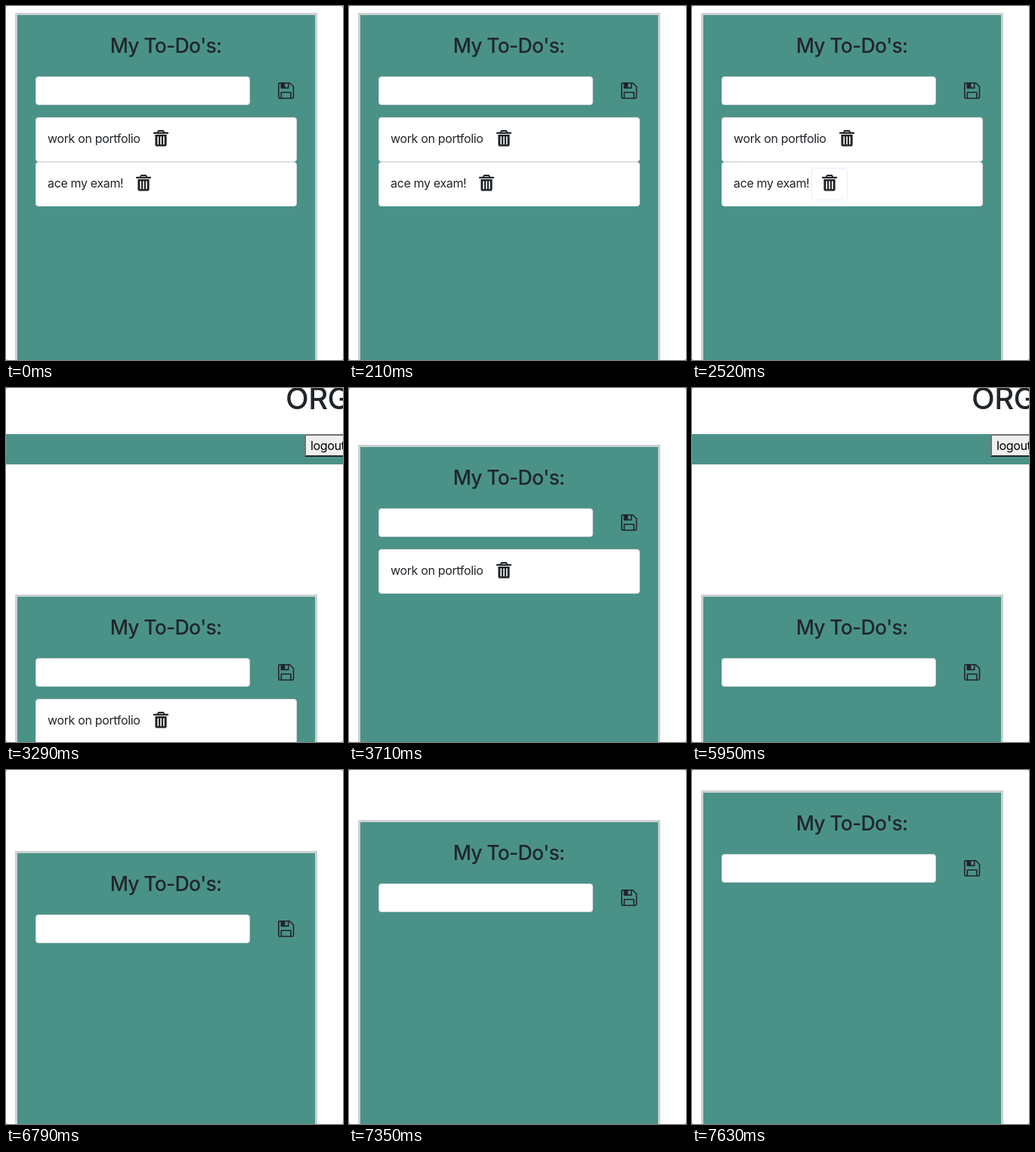
An HTML page for the animation above (8330 ms loop, 446 by 468 pixels).

```html
<!DOCTYPE html>
<html lang="en">
<head>
<meta charset="utf-8">
<title>To-do list</title>
<style>
html, body { margin: 0; width: 100%; height: 100%; overflow: hidden; background: #666; }
svg { display: block; width: 446px; height: 468px; background: #fff; border-radius: 2px; }
text { font: 16px Inter, "Liberation Sans", sans-serif; letter-spacing: -.35px; fill: #212529; }
.title { font-size: 26.5px; font-weight: 500; letter-spacing: -.7px; text-anchor: middle; }
.brand { font-size: 40px; font-weight: 500; letter-spacing: -.5px; }
.teal { fill: #4a9288; }
.ink { fill: #212529; }
.line { fill: none; stroke: #212529; stroke-width: 1.6; stroke-linejoin: round; }
</style>
</head>
<body>
<svg viewBox="0 0 446 468">
  <defs>
    <g id="trash">
      <path class="line" style="stroke-width:1.8" d="M-4.6-7.4l1.5-2.6h6.2l1.5 2.6"/>
      <rect class="ink" x="-10" y="-8.2" width="20" height="2.2" rx=".8"/>
      <path class="ink" d="M-7.6-5h15.2v13a2.6 2.6 0 0 1-2.6 2.6h-10a2.6 2.6 0 0 1-2.6-2.6z"/>
      <path stroke="#fff" stroke-width="1.6" stroke-linecap="round" d="M-3.8-2V7.4M0-2V7.4M3.8-2V7.4"/>
    </g>
  </defs>

  <g id="header">
    <text class="brand" x="370" y="28">ORGANIZE</text>
    <rect class="teal" y="61" width="446" height="40"/>
    <rect x="395" y="61" width="60" height="30" fill="#212529"/>
    <path d="M395 91V61h60v2h-58v26z" fill="#6f7375"/>
    <rect x="397" y="63" width="58" height="26" fill="#efefef"/>
    <text x="403" y="82" style="fill:#000">logout</text>
  </g>

  <g id="panel">
    <rect x="13.5" y="1.5" width="397" height="700" class="teal" stroke="#cdd1d3" stroke-width="3"/>
    <text class="title" x="211.5" y="53">My To-Do's:</text>
    <rect x="39.5" y="84.5" width="283" height="37" rx="3.5" fill="#fff" stroke="#ced4da"/>
    <g class="line" transform="translate(360 92)">
      <path d="M2 .8h13.5l5 5V19.5a1.5 1.5 0 0 1-1.5 1.5H2.3a1.5 1.5 0 0 1-1.5-1.5V2A1.2 1.2 0 0 1 2 .8z"/>
      <path d="M4.3 1v6.4h9.4V1M4.3 21v-7.8h12.6V21"/>
      <path class="ink" stroke="none" d="M4.3 1h5v6.4h-5z"/>
    </g>
    <g id="list"></g>
  </g>
</svg>
<script>
const LOOP = 8330, STEP = 70, HOME = 273;
const $ = id => document.getElementById(id);

const items = [
  { label: 'work on portfolio', icon: 205, from: 3290, until: 5950,
    focus: [[5320, 2], [5390, 4]] },
  { label: 'ace my exam!', icon: 182, from: Infinity, until: 3220,
    focus: [[2520, 1], [2590, 2.5], [2730, 3.4], [2870, 4]] }
];

$('list').innerHTML = items.map(({ label, icon }, i) => `
  <g transform="translate(0 ${138 + 59 * i})">
    <rect x="39.5" y=".5" width="345" height="58" rx="3.5" fill="#fff" stroke="#dfdfdf"/>
    <rect class="ring" fill="#0d6efd"/>
    <rect x="${icon - 23}" y="9" width="46" height="41" rx="4" fill="#fff"/>
    <text x="55" y="34">${label}</text>
    <use href="#trash" x="${icon}" y="28"/>
  </g>`).join('');
items.forEach((item, i) => {
  item.row = $('list').children[i];
  item.ring = item.row.querySelector('.ring');
});

function setAttrs(el, attrs) {
  for (const name in attrs) el.setAttribute(name, attrs[name]);
}

// Decelerating scroll; the first step is already visible at `start`.
function glide(t, start, end, from, to, power) {
  const k = Math.min(1, (t - start + STEP) / (end - start + STEP));
  return Math.round(to + (from - to) * (1 - k) ** power);
}

function panelTop(t) {
  if (t < 3220) return 9;
  if (t < 3640) return HOME;
  if (t < 4060) return glide(t, 3640, 3920, HOME, -1, 2.5);
  if (t < 5950) return t < 4130 ? 2 : 3;
  if (t < 6650) return HOME;
  if (t < 7350) return glide(t, 6650, 7000, HOME, 86, 3.15);
  return glide(t, 7350, 7630, 86, 27, 1.8);
}

function drawItem({ icon, from, until, focus, row, ring }, t) {
  const shown = t < 3220 || (t >= from && t < until);
  row.style.display = shown ? '' : 'none';
  const spread = focus.reduce((s, [at, size]) => t >= at ? size : s, 0);
  setAttrs(ring, {
    x: icon - 23 - spread, y: 9 - spread,
    width: 46 + 2 * spread, height: 41 + 2 * spread,
    rx: 4 + spread, opacity: spread ? .06 + .048 * spread : 0
  });
}

function draw(now) {
  const t = Math.floor(now % LOOP / STEP) * STEP;
  const top = panelTop(t);
  setAttrs($('header'), { transform: `translate(0 ${top - HOME})` });
  setAttrs($('panel'), { transform: `translate(0 ${top})` });
  items.forEach(item => drawItem(item, t));
}

const begin = performance.now();
function tick() {
  draw(performance.now() - begin);
  requestAnimationFrame(tick);
}
tick();
</script>
</body>
</html>
```
